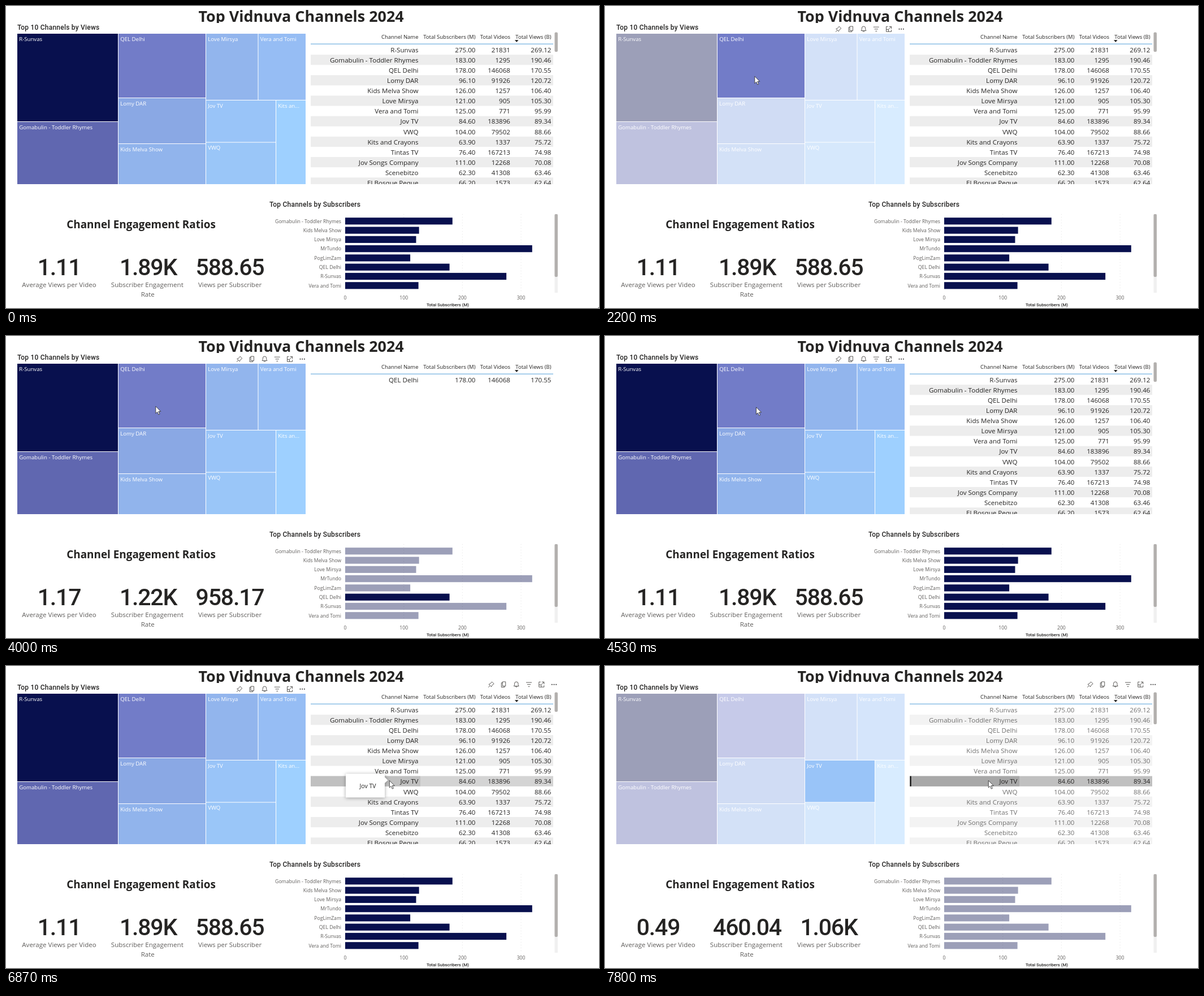
These frames come from a looping animation (1049x534 px, 8000 ms). An HTML page:

```html
<!DOCTYPE html>
<html lang="en">
<head>
<meta charset="utf-8">
<title>Channel dashboard</title>
<style>
html, body { margin: 0; width: 100%; height: 100%; overflow: hidden; background: #fff; }
svg { display: block; width: 100vw; height: 100vh; }
text { font-family: "Open Sans", "Noto Sans", sans-serif; fill: #252423; }
.din { font-family: Roboto, sans-serif; font-weight: 500; }
.head { font-weight: 700; }
.title { font-size: 12px; letter-spacing: .22px; }
.kpi { font-size: 41px; letter-spacing: -1.2px; text-anchor: middle; }
.note { font-size: 11.56px; fill: #605e5c; text-anchor: middle; }
.tile { font-size: 9.64px; fill: #fff; }
.th { font-size: 9.5px; text-anchor: end; }
.td { font-size: 11.6px; text-anchor: end; }
.cat { font-size: 8.66px; fill: #605e5c; text-anchor: end; }
.tick { font-size: 8.66px; fill: #605e5c; text-anchor: middle; }
.icon { fill: none; stroke: #4a4846; stroke-width: .9; }
</style>
</head>
<body>
<svg id="stage" viewBox="0 0 1049 534" preserveAspectRatio="none"></svg>
<script>
const LOOP = 8000;
const NAVY = '#08104e';
const stage = document.getElementById('stage');

function el(tag, attrs = {}, parent = stage, content) {
  const node = document.createElementNS('http://www.w3.org/2000/svg', tag);
  for (const key in attrs) node.setAttribute(key, attrs[key]);
  if (content !== undefined) node.textContent = content;
  parent.appendChild(node);
  return node;
}
const rect = (x, y, width, height, fill, parent, extra) =>
  el('rect', { x, y, width, height, fill, ...extra }, parent);
const label = (x, y, cls, content, parent) => el('text', { x, y, class: cls }, parent, content);
const group = (parent) => el('g', {}, parent);
const show = (node, on) => node.setAttribute('visibility', on ? 'visible' : 'hidden');
const ramp = (t, a, b) => Math.min(1, Math.max(0, (t - a) / (b - a)));

// Headings
el('text', { x: 522, y: 28, class: 'head', 'font-size': 26.9, 'text-anchor': 'middle' }, stage, 'Top Vidnuva Channels 2024');
rect(20, 30, 510, 18, '#fff');
label(20, 42, 'din title', 'Top 10 Channels by Views');
label(466, 355.3, 'din title', 'Top Channels by Subscribers');
el('text', { x: 239, y: 392.5, class: 'head', 'font-size': 18.9, 'text-anchor': 'middle' }, stage, 'Channel Engagement Ratios');

// Shared names
const LUNE = 'Gomabulin - Toddler Rhymes', SERIES = 'R-Sunvas', DELHI = 'QEL Delhi', LOMY = 'Lomy DAR',
  MELVA = 'Kids Melva Show', LOVE = 'Love Mirsya', VERA = 'Vera and Tomi', JOV = 'Jov TV', VWQ = 'VWQ';

// Treemap: name, left, top, right, bottom, colour
const tiles = [
  [SERIES, 20, 49, 198, 204, NAVY],
  [LUNE, 20, 205, 198, 315, '#6067b0'],
  [DELHI, 199, 49, 353, 162, '#727cc8'],
  [LOMY, 199, 163, 353, 243, '#8aa8e4'],
  [MELVA, 199, 244, 353, 315, '#91b4ec'],
  [LOVE, 354, 49, 445.5, 166, '#92b5ed'],
  [VERA, 446.5, 49, 530, 166, '#96bdf4'],
  [JOV, 354, 167, 477, 240.5, '#99c4f8'],
  [VWQ, 354, 241.5, 477, 315, '#9ac6f8'],
  ['Kits an...', 478, 167, 530, 315, '#9ed0ff']
].map(([name, x, y, r, b, fill]) => {
  const box = rect(x, y, r - x, b - y, fill);
  label(x + 3.2, y + 12.8, 'tile', name);
  return { name, box };
});

// Table
const ROW = 18.1, TOP = 68;
const COLS = [729.5, 830.5, 892, 964.5];
['Channel Name', 'Total Subscribers (M)', 'Total Videos', 'Total Views (B)']
  .forEach((name, i) => label(COLS[i], 58.3, 'th', name));
el('path', { d: 'M900 60.2h6.6l-3.3 3.6z', fill: '#111' });
rect(539, 66.6, 429, 1.1, '#62a7dc');

const clip = el('clipPath', { id: 'body' }, el('defs'));
rect(530, 68, 440, 247, '#000', clip);
const table = el('g', { 'clip-path': 'url(#body)' });
const rows = [
  [SERIES, '275.00', '21831', '269.12'],
  [LUNE, '183.00', '1295', '190.46'],
  [DELHI, '178.00', '146068', '170.55'],
  [LOMY, '96.10', '91926', '120.72'],
  [MELVA, '126.00', '1257', '106.40'],
  [LOVE, '121.00', '905', '105.30'],
  [VERA, '125.00', '771', '95.99'],
  [JOV, '84.60', '183896', '89.34'],
  [VWQ, '104.00', '79502', '88.66'],
  ['Kits and Crayons', '63.90', '1337', '75.72'],
  ['Tintas TV', '76.40', '167213', '74.98'],
  ['Jov Songs Company', '111.00', '12268', '70.08'],
  ['Scenebitzo', '62.30', '41308', '63.46'],
  ['El Bosque Peque', '66.20', '1573', '62.64']
].map((cells, i) => {
  const y = TOP + i * ROW;
  const g = group(table);
  const band = group(g);
  if (i % 2) rect(539, y, 429, ROW, '#ededed', band);
  const hover = group(g);
  const wide = rect(539, y, 429, ROW, '#d4d4d4', hover);
  const first = rect(539, y, 194, ROW, '#c0c0c0', hover);
  const mark = rect(539.5, y, 2.2, ROW, '#111', g);
  cells.forEach((cell, c) => label(COLS[c], y + 13.7, 'td', cell, g));
  return { g, hover, wide, first, mark };
});
const thumb = rect(970.5, 46.5, 5.5, 34.5, '#b3b0ae', stage, { rx: 2 });

// Cards
const cards = [94, 251.5, 396].map(x => label(x, 475.5, 'din kpi', ''));
label(94, 497, 'note', 'Average Views per Video');
label(249.8, 497, 'note', 'Subscriber Engagement');
label(250.8, 513.5, 'note', 'Rate');
label(396, 497, 'note', 'Views per Subscriber');

// Bar chart
const UNIT = 1.037;
[0, 100, 200, 300].forEach(v => {
  const x = 600 + v * UNIT;
  if (v) el('path', { d: `M${x} 368V506`, stroke: '#ddd', 'stroke-width': .9, 'stroke-dasharray': '1 4' });
  label(x, 519, 'tick', v);
});
el('text', { x: 781.5, y: 530.6, class: 'din', 'font-size': 7.8, 'text-anchor': 'middle' }, stage, 'Total Subscribers (M)');
const bars = [
  [LUNE, 183], [MELVA, 126], [LOVE, 121], ['MrTundo', 319],
  ['PogLimZam', 111], [DELHI, 178], [SERIES, 275], [VERA, 125]
].map(([name, value], i) => {
  const y = 374.2 + i * 16.28;
  label(593, y + 9.4, 'cat', name);
  return { name, box: rect(600, y, value * UNIT, 12.2, NAVY) };
});
rect(970.5, 368, 5.5, 139, '#f0f0f0');
rect(970.5, 368, 5.5, 111, '#b3b0ae', stage, { rx: 2 });

// Visual header icons
function toolbar(x, y) {
  const g = el('g', { class: 'icon', transform: `translate(${x} ${y})` });
  const icon = (i, d) => el('path', { d, transform: `translate(${i * 22.25} 0)` }, g);
  icon(0, 'M-5 5l3-3M-4.2-.4L.4 4.2 1.3 1.6 4.8-1.2 1.2-4.8-1.6-1.3z');
  icon(1, 'M-2.2-4.8h5.4v7.6h-5.4zM-2.2-3h-2v7.8h5.6v-2');
  icon(2, 'M-4.4 2.8h8.8L3.2.6V-1.6a3.2 3.2 0 0 0-6.4 0V.6zM-1.4 3.2a1.4 1.4 0 0 0 2.8 0');
  icon(3, 'M-5-3.6H5M-3.2 0H3.2M-1.4 3.6H1.4');
  icon(4, 'M-1.5-4.5h-3v9h9v-3M.5-4.5h4v4M4.5-4.5L-.2.2M-4.5.6h4v3.9');
  const dots = group(g);
  [-3.7, 0, 3.7].forEach(d => el('circle', { cx: 111.2 + d, cy: 0, r: 1, fill: '#333', stroke: 'none' }, dots));
  return g;
}
const mapTools = toolbar(413, 40.8);
const tableTools = toolbar(858.3, 32.7);

// Tooltip
const tip = el('g', { style: 'filter: drop-shadow(0 1px 3px rgba(0,0,0,.35))' });
el('path', { d: 'M601 190.5H670V196.5L675.5 202 670 207V232.5H601z', fill: '#fff' }, tip);
el('text', { x: 640, y: 216.3, 'font-size': 10.6, 'text-anchor': 'middle' }, tip, JOV);

const cursor = el('path', {
  d: 'M0 0V12.6L2.9 9.9 5 14.7 7.1 13.8 5 9.1H9z',
  fill: '#fff', stroke: '#222', 'stroke-width': .8, 'stroke-linejoin': 'round'
});

// Pointer path: time, x, y, easing into the point
const linear = k => k;
const easeIn = k => k ** 1.5;
const easeOut = k => 1 - (1 - k) ** 2;
const path = [
  [0, 1048, 533, linear], [20, 1048, 533, linear],
  [870, 442, 217, easeOut], [1470, 264.8, 124.3, easeOut],
  [4470, 264.8, 124.3, linear], [5330, 408, 209, easeIn],
  [5600, 446, 225, linear], [5860, 545, 235, easeIn],
  [6200, 663, 205, easeOut], [6400, 678.3, 202.5, easeOut], [LOOP, 678.3, 202.5, linear]
];
function pointer(t) {
  const i = path.findIndex(p => p[0] > t);
  const [t0, x0, y0] = path[i - 1], [t1, x1, y1, ease] = path[i];
  const k = ease((t - t0) / (t1 - t0));
  return [x0 + (x1 - x0) * k, y0 + (y1 - y0) * k];
}

const ALL = ['1.11', '1.89K', '588.65'];
const ONLY_DELHI = ['1.17', '1.22K', '958.17'];
const ONLY_JOV = ['0.49', '460.04', '1.06K'];

function draw(t) {
  const [x, y] = pointer(t);
  cursor.setAttribute('transform', `translate(${x} ${y})`);

  const picked = t >= 2000 && t < 4000 ? DELHI : t >= 7470 ? JOV : null;
  tiles.forEach(({ name, box }) => box.setAttribute('opacity', picked && name !== picked ? .4 : 1));

  const filtered = t >= 2260 && t < 4130;
  const chosen = t >= 7265;
  const inTable = x > 539 && x < 976 && y > 35 && y < 315;
  const over = !filtered && inTable ? Math.floor((y - TOP) / ROW) : -1;
  rows.forEach((row, i) => {
    const selected = chosen && i === 7;
    show(row.g, !filtered || i === 2);
    row.g.setAttribute('transform', `translate(0 ${filtered ? -i * ROW : 0})`);
    row.g.setAttribute('opacity', chosen && !selected ? .65 : 1);
    row.hover.setAttribute('display', i === over || selected ? 'inline' : 'none');
    row.mark.setAttribute('display', selected ? 'inline' : 'none');
    row.wide.setAttribute('fill', selected ? '#c0c0c0' : '#d4d4d4');
    row.first.setAttribute('fill', selected ? '#a8a8a8' : '#c0c0c0');
  });
  show(thumb, !filtered);
  thumb.setAttribute('height', chosen || (t >= 4130 && t < 4530) ? 56.5 : 34.5);

  const values = filtered ? ONLY_DELHI : t >= 7600 ? ONLY_JOV : ALL;
  cards.forEach((card, i) => { card.textContent = values[i]; });

  const dim = ramp(t, 2200, 2520) - ramp(t, 4050, 4330) + ramp(t, 7470, 7790);
  bars.forEach(({ name, box }) =>
    box.setAttribute('opacity', name === DELHI && t < 7000 ? 1 : 1 - .6 * dim));

  show(mapTools, x < 535 || (t > 2000 && !chosen));
  show(tableTools, inTable);
  show(tip, t >= 6865 && t < 7265);
}

function tick(now) {
  draw(now % LOOP);
  requestAnimationFrame(tick);
}
draw(0);
requestAnimationFrame(tick);
</script>
</body>
</html>
```
